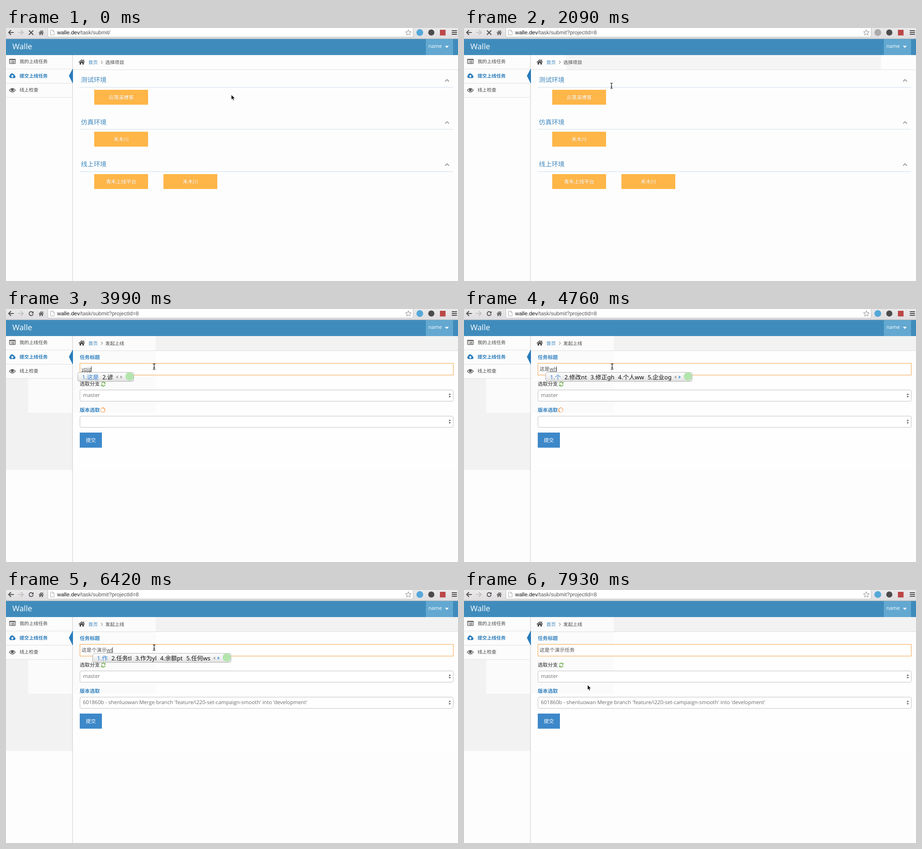
Animation of 999 by 561 pixels, one loop 8000 ms. Source, as an HTML page:

```html
<!DOCTYPE html>
<html lang="zh">
<head>
<meta charset="utf-8">
<title>Task submit</title>
<style>
html,body{margin:0;width:100%;height:100%;overflow:hidden;background:#fdfdfd}
svg{display:block;width:999px;height:561px}
text{font-family:'Open Sans','Noto Sans CJK SC','Noto Sans CJK',sans-serif;text-rendering:geometricPrecision;white-space:pre}
.url{font:12px 'Liberation Sans',Arial,sans-serif}
.ime{font:13px 'Noto Sans','Noto Sans CJK SC','Noto Sans CJK',sans-serif}
.b{font-weight:700}
.m{font-weight:500}
.c{text-anchor:middle}
.l{fill:none;stroke-linecap:round;stroke-linejoin:round}
</style>
</head>
<body>
<svg id="stage" viewBox="0 0 999 561">
<defs>
  <linearGradient id="bar" x2="0" y2="1"><stop stop-color="#ebeaeb"/><stop offset="1" stop-color="#dedcde"/></linearGradient>
  <linearGradient id="pop" x2="0" y2="1"><stop stop-color="#fefefe"/><stop offset=".5" stop-color="#f1f1f1"/><stop offset="1" stop-color="#e0e0e0"/></linearGradient>
  <path id="house" d="M0 6.5L7 .5L14 6.5L13 7.7L7 2.6L1 7.7ZM2.3 7.6L7 3.7L11.7 7.6V12H8.4V8.4H5.6V12H2.3ZM10.3 1H12.2V4.3L10.3 2.7Z"/>
</defs>
<rect width="999" height="561" fill="#fdfdfd"/>

<g id="tint">
  <rect y="60" width="147" height="297" fill="#f2f2f2"/>
  <rect x="148" y="60" width="851" height="32" fill="#f2f2f2"/>
  <rect x="148" y="93" width="851" height="264" fill="#fefefe"/>
  <rect id="pale" x="49" y="60" width="282" height="170" fill="#fbfbfb"/>
</g>
<rect id="haze" x="226" y="60" width="696" height="32" fill="#f5f5f5"/>

<g id="side">
  <rect y="60" width="147" height="94" fill="#fcfcfc"/>
  <path d="M0 91H147M0 122.5H147M0 154H147" stroke="#dfdfdf"/>
  <path d="M147 60V561" stroke="#c9c9c9"/>
  <path d="M148 91V122H147L139 106L147 91Z" fill="#2a7cbb"/>
  <g id="sideIcons">
    <rect x="7.6" y="69.1" width="13.2" height="9.8" rx="1.2" fill="none" stroke="#555" stroke-width="1.2"/>
    <path d="M7.6 70H20.8" stroke="#555" stroke-width="2"/>
    <path d="M9.4 73H10.8M12 73H19M9.4 75H10.8M12 75H19M9.4 77H10.8M12 77H19" stroke="#555"/>
    <path d="M10.2 111A3.6 3.6 0 0 1 9 104.4A4.3 4.3 0 0 1 17 102.8A2.6 2.6 0 0 1 19.2 105.3A3 3 0 0 1 18.6 111Z" fill="#2a7cbb"/>
    <path d="M14 103.8L17.2 107.2H15.2V109.8H12.8V107.2H10.8Z" fill="#fff"/>
    <path d="M7.4 138Q14 129.6 20.6 138Q14 146 7.4 138Z" fill="none" stroke="#555" stroke-width="1.3"/>
    <circle cx="14" cy="137.2" r="2.9" fill="#555"/>
  </g>
</g>

<g id="crumb">
  <path d="M148 92.5H999" stroke="#dfdfdf"/>
  <use href="#house" x="160.4" y="69" fill="#444"/>
  <path d="M210.5 73L213.3 76L210.5 79" class="l" stroke="#999" stroke-width="1.2"/>
</g>

<rect y="24" width="999" height="36" fill="#3f8cbc"/>
<rect x="928" y="24.5" width="60" height="35.5" fill="#62a8d1"/>
<path d="M970 39.5H978.6L974.3 44.3Z" fill="#fff"/>

<rect width="999" height="24" fill="url(#bar)"/>
<path d="M0 24H999" stroke="#b5b5b5" stroke-width=".8"/>
<rect x="92.5" y="-4" width="807.5" height="24" rx="2" fill="#fff" stroke="#bdbdbd"/>
<g class="l" stroke-width="2.2">
  <path d="M16.5 10H6M10.5 5.4L5.8 10L10.5 14.6" stroke="#555"/>
  <path d="M27.5 10H38M33.5 5.4L38.2 10L33.5 14.6" stroke="#c4c4c4"/>
  <path id="stop" d="M51.3 6L59.7 14.4M59.7 6L51.3 14.4" stroke="#555"/>
  <g id="reload"><path d="M58.8 7.2A4.4 4.4 0 1 0 59.8 11.4" stroke="#555" stroke-width="1.9"/><path d="M61 4.8V9.6H56.2Z" fill="#555" stroke="none"/></g>
  <path d="M986 6H996M986 10H996M986 14H996" stroke="#4b4b4b" stroke-width="2"/>
</g>
<use href="#house" transform="translate(72 4.5) scale(.82 .92)" fill="#555"/>
<path d="M98.5 4.5H103.5L106.5 7.5V15.5H98.5ZM103.5 4.5V7.5H106.5" fill="#fff" stroke="#aaa"/>
<path id="star" fill="none" stroke="#8b8b8b"/>
<circle id="ext" cx="914.6" cy="10" r="7.5"/>
<circle cx="940" cy="10" r="6.8" fill="#4c4c4c"/>
<rect x="959" y="4" width="12.5" height="12.5" fill="#bb4747"/>

<g id="list"></g>

<g id="form">
  <rect id="title" x="163.5" y="120.5" width="825" height="26" fill="#fff"/>
  <g fill="#fff" stroke="#c0c0c0"><rect x="163.5" y="179.5" width="825" height="25" rx="3"/><rect x="163.5" y="237.5" width="825" height="25" rx="3"/></g>
  <path d="M978.2 190.4L980.7 186.8L983.2 190.4ZM978.2 193L980.7 196.6L983.2 193ZM978.2 248.4L980.7 244.8L983.2 248.4ZM978.2 251L980.7 254.6L983.2 251Z" fill="#666"/>
  <g fill="none" stroke="#69aa46" stroke-width="1.7"><path d="M211 165.4A4.1 4.1 0 0 1 218 163.4M219 167.6A4.1 4.1 0 0 1 212 169.6"/></g>
  <path d="M219.8 161.4V165.4H215.8ZM210.2 171.6V167.6H214.2Z" fill="#69aa46"/>
  <rect x="163" y="274" width="49" height="33.5" fill="#3d88c9"/>
  <g id="spin" fill="#f5913c"></g>
</g>

<g id="typing">
  <rect id="under" y="138" height="1" fill="#444"/>
  <rect id="caret" y="127" width="1" height="12" fill="#333"/>
</g>
<g id="popup">
  <rect id="box" y="140.5" height="20" rx="4" fill="url(#pop)" stroke="#a9a9a9" stroke-width=".9"/>
  <text id="cands" class="ime" y="156" fill="#111"></text>
  <g id="tail">
    <path d="M-35.5 147.5V154.5L-40 151Z" fill="#a8a8a8"/>
    <path id="next" d="M-30 147.5V154.5L-25.3 151Z"/>
    <circle cx="-9.7" cy="149.3" r="9.3" fill="#b4e4ae"/>
  </g>
</g>

<g id="cursor" stroke-linejoin="round">
  <path id="arrow" d="M0 0V11L2.5 8.7L4.3 12.8L6.2 12L4.5 8H8Z" fill="#000" stroke="#fff" stroke-width=".8"/>
  <path id="hand" d="M-1.2 1Q0-.6 1.2 1V5Q3-.2 3.4 5.3Q5 4 5.4 6Q7 5 7 7V10Q6.6 12 5.6 13V15H-1V13Q-4 10-5.2 7.6Q-4.4 6-1.2 8.6Z" fill="#fff" stroke="#000" stroke-width=".9"/>
  <path id="beam" d="M-2.7-6Q0-6 0-4.6Q0-6 2.7-6M0-4.8V4.8M-2.7 6Q0 6 0 4.6Q0 6 2.7 6M-1.4 2H1.4" fill="none" stroke="#000" stroke-width="1.1"/>
</g>
</svg>
<script>
const LOOP = 8000, NS = 'http://www.w3.org/2000/svg';
const $ = id => document.getElementById(id);
const show = (id, on) => $(id).style.display = on ? '' : 'none';
const set = (node, attrs) => { for (const k in attrs) node.setAttribute(k, attrs[k]); return node; };
const add = (parent, tag, attrs) => parent.appendChild(set(document.createElementNS(NS, tag), attrs));

function label(parent, str, x, y, size, fill, cls = '') {
  const node = add(parent, 'text', { x, y, fill, class: cls });
  if (size) node.style.fontSize = size + 'px';
  node.textContent = str;
  return node;
}

// Fixed text
const root = $('stage'), form = $('form'), blue = '#3583c0';
label(root, 'Walle', 14, 47, 17.3, '#fff');
label(root, 'name', 933.5, 44, 11.2, '#fff');
label(root, 'walle.dev', 113, 14, 0, '#111', 'url');
const path = label(root, '', 163, 14, 0, '#555', 'url');
label($('side'), '我的上线任务', 30, 77.8, 10.35, '#444', 'm');
label($('side'), '提交上线任务', 30, 109.5, 10.35, '#2a7cbb', 'b');
label($('side'), '线上检查', 30, 141.4, 10.35, '#444', 'm');
label($('crumb'), '首页', 182, 79.5, 10.4, '#3f88be', 'm');
const here = label($('crumb'), '', 219.5, 79.5, 10.4, '#444', 'm');

label(form, '任务标题', 163, 111, 11.1, blue, 'b');
label(form, '选取分支', 163, 170.3, 11.1, '#222', 'm');
label(form, '版本选取', 163, 228.3, 11.1, blue, 'b');
label(form, 'master', 170, 195, 11.5, '#737373');
label(form, '提交', 187.6, 295, 11.1, '#fff', 'c m');
const version = label(form, "601860b - shenluowan Merge branch 'feature/i220-set-campaign-smooth' into 'development'",
  170, 253, 11.53, '#6c6c6c');
const done = label($('typing'), '', 167, 137.2, 11.1, '#505050', 'm');
const comp = label($('typing'), '', 167, 137, 11.5, '#505050');
root.append($('popup'), $('cursor'));

// Project list
[['测试环境', '云落溪博客'], ['仿真环境', '禾木川'], ['线上环境', '青禾上线平台', '禾木川']].forEach(([head, ...names], i) => {
  const y = 93.4 * i, g = $('list');
  label(g, head, 165.5, 120.3 + y, 14.2, '#4089bf');
  add(g, 'path', { d: `M163 ${Math.round(132 + y) - .5}H988`, stroke: '#d0dfea' });
  add(g, 'path', { d: `M970.6 ${118.6 + y}l4.2-4.2l4.2 4.2`, fill: 'none', stroke: '#a8a8a8', 'stroke-width': 2.3 });
  names.forEach((name, k) => {
    const x = 195 + 153 * k;
    add(g, 'rect', { x, y: Math.round(137 + y), width: 119, height: 33, fill: '#ffb648' });
    label(g, name, x + 59.8, 158.8 + y, 11.2, '#b98432', 'c m').setAttribute('opacity', .45);
    label(g, name, x + 59.5, 158 + y, 11.2, '#fff', 'c m');
  });
});

const points = Array.from({ length: 10 }, (_, i) => {
  const r = i % 2 ? 2.9 : 6.8, a = i * Math.PI / 5;
  return (889.3 + r * Math.sin(a)).toFixed(2) + ' ' + (10.5 - r * Math.cos(a)).toFixed(2);
});
$('star').setAttribute('d', 'M' + points.join('L') + 'Z');

for (let i = 0; i < 8; i++) {
  const a = i * Math.PI / 4;
  add($('spin'), 'circle', { cx: 4.8 * Math.cos(a), cy: 4.8 * Math.sin(a), r: 1.5 - i * .09 });
}

// Steps: [start, ...values]
const moves = [
  [0, 'arrow', 498, 148], [150, 'arrow', 438, 133], [420, 'arrow', 324, 181], [590, 'arrow', 268, 216],
  [760, 'hand', 222, 240], [920, 'hand', 206, 244], [1550, 'hand', 238, 232], [1720, 'arrow', 292, 172],
  [1900, 'arrow', 320, 132], [2090, 'beam', 326, 128], [2840, 'beam', 327.4, 127.6], [7340, 'arrow', 310, 176],
  [7490, 'arrow', 282, 222], [7640, 'arrow', 268, 233], [7790, 'arrow', 270, 222], [7930, 'arrow', 273, 210.5]
];
const keys = [
  [0, '', '', ''],
  [3470, '', 'y', '1.主 2.为了yl 3.方法if 4.文化wx 5.应该yy'],
  [3640, '', 'yp', '1.这 2.这些hx 3.这样su 4.这种tk 5.这个wh'],
  [3820, '', 'ypj', '1.这里f 2.这是g 3.这时f'],
  [3990, '', 'ypjg', '1.这是 2.谚'],
  [4170, '这是', '', ''],
  [4560, '这是', 'w', '1.人 2.会议yy 3.公司ng 4.全部uk 5.但是jg'],
  [4760, '这是', 'wh', '1.个 2.修改nt 3.修正gh 4.个人ww 5.企业og'],
  [4940, '这是', 'whj', '1.个 2.候'],
  [5110, '这是个', '', ''],
  [5290, '这是个', 'i', '1.不 2.学习nu 3.没有de 4.当然qd 5.小时jf'],
  [5460, '这是个', 'ip', '1.学 2.演示fi 3.学生tg 4.演出bm'],
  [5630, '这是个', 'ipf', '1.演示i 2.学者t 3.淙'],
  [5800, '这是个', 'ipfi', '1.演示 2.淙'],
  [6100, '这是个演示', 'w', '1.人 2.会议yy 3.公司ng 4.全部uk 5.但是jg'],
  [6420, '这是个演示', 'wt', '1.作 2.任务tl 3.作为yl 4.余额pt 5.任何ws'],
  [6600, '这是个演示', 'wtt', '1.任务l 2.作物r 3.条'],
  [6750, '这是个演示', 'wttl', '1.任务 2.作图 3.任务表'],
  [7050, '这是个演示任务', '', '']
];
const at = (list, t) => list.findLast(s => s[0] <= t);

function drawCursor(t) {
  const [, kind, x, y] = at(moves, t);
  for (const id of ['arrow', 'hand', 'beam']) show(id, id === kind);
  set($('cursor'), { transform: `translate(${x} ${y})` });
}

function drawPopup(left, list) {
  show('popup', list);
  if (!list) return;
  const text = $('cands'), gap = 8;
  text.textContent = '';
  text.setAttribute('x', left + 10);
  const items = list.split(' ');
  items.forEach((s, i) => {
    add(text, 'tspan', i ? { dx: gap } : { fill: '#2a7fd4' }).textContent = s;
  });
  // The text length leaves out the gaps
  const right = left + 56 + text.getComputedTextLength() + (items.length - 1) * gap;
  set($('box'), { x: left + .5, width: right - left - 1 });
  set($('tail'), { transform: `translate(${right} 0)` });
  set($('next'), { fill: items.length > 4 ? '#5b9fdc' : '#a8a8a8' });
}

let lastKey;
function drawTyping(t) {
  const key = at(keys, t), [, text, code, list] = key;
  const x = 167 + 11.1 * text.length;
  show('caret', t >= 3310 && t < 7340);
  if (key === lastKey) return;
  lastKey = key;
  done.textContent = text;
  comp.textContent = code;
  comp.setAttribute('x', x);
  const w = code ? comp.getComputedTextLength() : 0;
  set($('under'), { x, width: w });
  set($('caret'), { x: Math.round(x + w) - 1 });
  // The candidate window stays put while the last word is typed
  drawPopup(Math.min(Math.round(x) - 9, 191), list);
}

function draw(t) {
  const loading = t < 150 || (t >= 1250 && t < 2840);
  const next = t >= 2390, ready = t >= 2660;
  show('stop', loading);
  show('reload', !loading);
  path.textContent = t < 2090 ? '/task/submit/' : '/task/submit?projectId=8';
  set($('ext'), { fill: t >= 2090 && t < 2390 ? '#aaa' : '#56a8d8' });
  show('haze', t >= 2090 && !next);
  show('tint', next);
  show('pale', t >= 2840);
  show('sideIcons', !next || ready);
  here.textContent = next ? '发起上线' : '选择项目';
  show('list', !next);
  show('form', ready);
  show('typing', ready);
  set($('title'), { stroke: t < 3310 ? '#adadad' : '#f2a145' });
  const loaded = t >= 5460;
  version.style.display = loaded ? '' : 'none';
  show('spin', t >= 2840 && !loaded);
  set($('spin'), { transform: `translate(214 224) rotate(${Math.floor(t / 175) * 45})` });
  drawTyping(t);
  drawCursor(t);
}

const start = performance.now();
function tick() {
  draw((performance.now() - start) % LOOP);
  requestAnimationFrame(tick);
}
tick();
</script>
</body>
</html>
```
